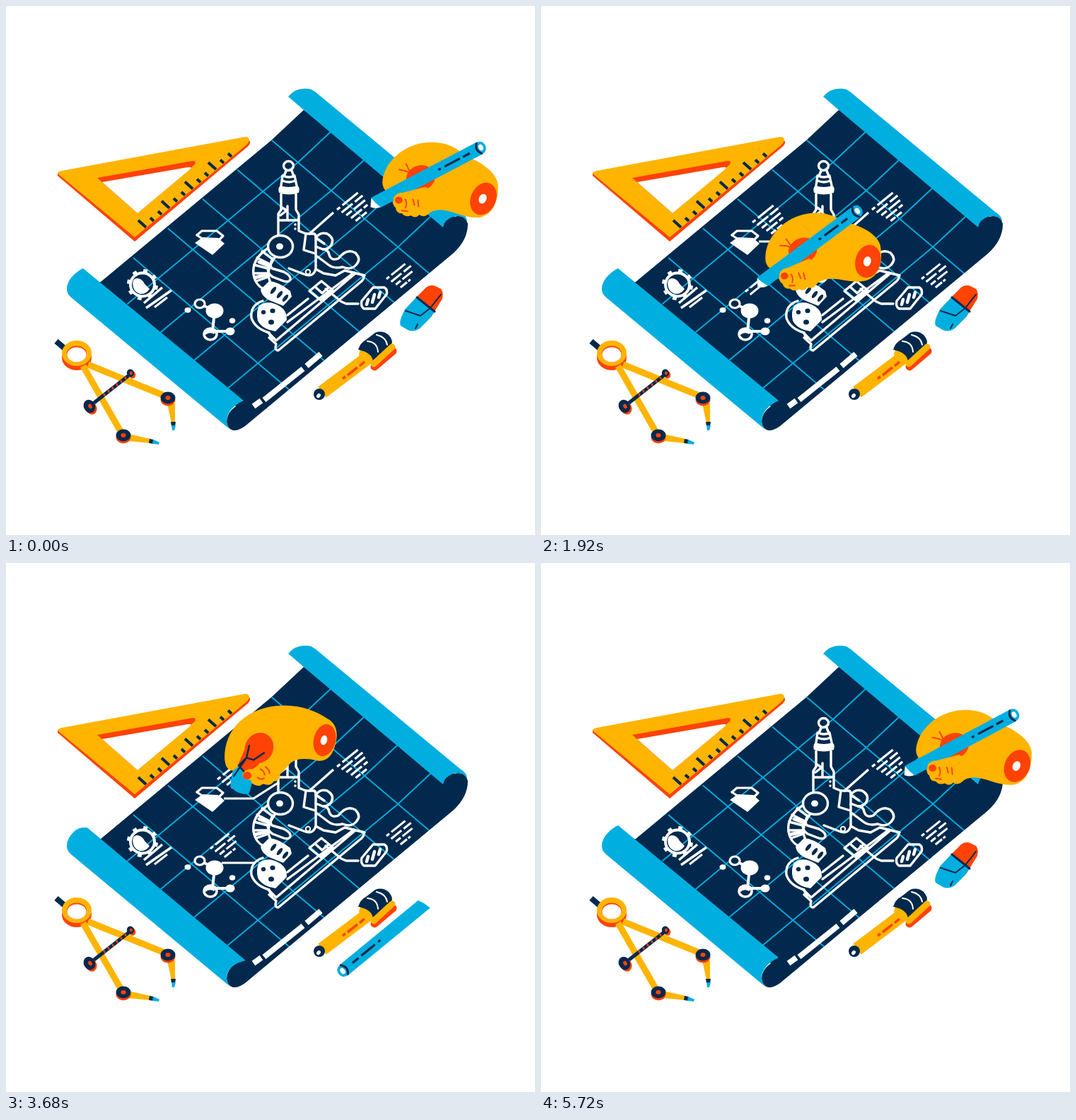
These frames come from a looping animation (748x748 px, 5760 ms). An HTML page with a canvas:

```html
<!DOCTYPE html>
<html lang="en">
<head>
<meta charset="utf-8">
<title>Blueprint desk</title>
<style>
html, body { margin: 0; width: 100%; height: 100%; overflow: hidden; background: #fff; }
canvas { display: block; }
</style>
</head>
<body>
<canvas id="stage" width="748" height="748"></canvas>
<script>
const ctx = document.getElementById('stage').getContext('2d');
const NAVY = '#02294d', CYAN = '#00aee0', GOLD = '#ffb400', RED = '#ff4206', WHITE = '#fff';
const LOOP = 5760, STEP = 40, RAD = Math.PI / 180;

const fill = (d, c) => { ctx.fillStyle = c; ctx.fill(new Path2D(d)); };
const stroke = (d, c, w, cap = 'round') => {
  ctx.strokeStyle = c; ctx.lineWidth = w; ctx.lineCap = cap; ctx.lineJoin = 'round';
  ctx.stroke(new Path2D(d));
};
const line = (x1, y1, x2, y2, c, w, cap = 'butt') => stroke(`M${x1} ${y1}L${x2} ${y2}`, c, w, cap);
const oval = (x, y, rx, ry, c, rot = 0, w = 0) => {
  ctx.beginPath();
  ctx.ellipse(x, y, rx, ry, rot * RAD, 0, 7);
  if (w) { ctx.strokeStyle = c; ctx.lineWidth = w; ctx.stroke(); }
  else { ctx.fillStyle = c; ctx.fill(); }
};
const at = (x, y, rot, draw, sx = 1, sy = sx) => {
  ctx.save();
  ctx.translate(x, y); ctx.rotate(rot * RAD); ctx.scale(sx, sy);
  draw();
  ctx.restore();
};
const clamp = v => Math.max(0, Math.min(1, v));
const span = (t, a, b) => clamp((t - a) / (b - a));
const mix = (a, b, k) => a + (b - a) * k;
// keys: rows of [time, ...values], eased between rows
function track(keys, t) {
  let i = 0;
  while (i < keys.length - 2 && t >= keys[i + 1][0]) i++;
  const a = keys[i], b = keys[i + 1], u = span(t, a[0], b[0]), k = u * u * (3 - 2 * u);
  return a.slice(1).map((v, j) => mix(v, b[j + 1], k));
}

// slanted note strokes
const note = (x, y, lens) => lens.map((n, i) => {
  const sx = x + i * 6.6, sy = y + i * 4;
  return [sx, sy, sx + n * 0.78, sy - n * 0.63];
});
const notes = {
  topRight: note(468, 288, [38, 38, 34, 30, 20]),
  topLeft: note(299, 306, [38, 38, 34, 30, 20]),
  lowLeft: note(289, 404, [34, 36, 30, 20]),
  right: note(538, 386, [34, 36, 30, 18])
};
const leads = {
  top: [[308, 333, 350, 333], [350, 333, 386, 310]],
  low: [[305, 424, 352, 424]]
};
function drawPart(segs, from, to, w, gaps) {
  const n = segs.length;
  segs.forEach(([x1, y1, x2, y2], i) => {
    const a = clamp(from * n - i), b = clamp(to * n - i);
    if (b <= a) return;
    const piece = (p, q) => {
      p = Math.max(p, a); q = Math.min(q, b);
      if (q > p) line(mix(x1, x2, p), mix(y1, y2, p), mix(x1, x2, q), mix(y1, y2, q), WHITE, w);
    };
    const gap = 0.2 + (i * 0.37) % 0.6;
    if (gaps) { piece(0, gap - 0.05); piece(gap + 0.06, 1); } else piece(0, 1);
  });
}
function pointOn(segs, k) {
  const p = clamp(k) * segs.length, i = Math.min(segs.length - 1, Math.floor(p)), s = segs[i];
  return [mix(s[0], s[2], p - i), mix(s[1], s[3], p - i)];
}

function paper(loose) {
  const sheet = 'M421 147L375 190L134 390L128 392L325 566Q312 575 312 588Q314 601 325 600Q331 599 338 594L632 350Q653 331 653 308Q649 294 634 298Z';
  fill(sheet, NAVY);
  ctx.save();
  ctx.clip(new Path2D(sheet));
  for (let i = 0; i < 5; i++) {
    const x = 376 - i * 49, y = 190 + i * 41.5;
    line(x, y, x + 260, y + 220, CYAN, 1.8);
  }
  // the sheet bends near the upper roll
  for (let i = 0; i < 4; i++)
    stroke(`M${459 + i * 47} ${178 + i * 40}l-46 43l-241 200`, CYAN, 1.8);
  ctx.restore();
  fill('M399 128Q412 113 432 118L438 122L642 291Q652 297 652 305Q646 294 632 298Q620 302 618 313L421 147Z', CYAN);
  const k = loose ? 4 : 0;
  fill(`M86 400Q86 389 97 379Q104 373 ${109 + k * 1.5} ${371 + k * .8}L${336 + k * .7} ${558 + k}Q314 568 312 585Q312 594 317 599L92 412Q86 407 86 400Z`, CYAN);
  line(350, 566, 361, 558, WHITE, 8);
  line(365, 557, 420, 513, WHITE, 8);
  line(425, 509, 445, 492, WHITE, 8);
}

function microscope() {
  const w = 3.4, s = d => stroke(d, WHITE, w);
  oval(399.5, 226, 7, 6.5, WHITE, 0, w);
  s('M396 233L394 238M404 233L406 238M392 240Q400 244 408 240M391 247Q400 251 409 247M391 240L389 254M408 240L411 254');
  fill('M388 254Q400 258 412 254Q416 256 414 264Q400 269 386 264Q384 257 388 254Z', WHITE);
  s('M389 266V288L385 294V326M410 266V288L414 295V318L424 322M398 283V302M389 284L398 290M388 296L397 289M386 303H413');
  oval(409, 309, 1.8, 1.8, WHITE); oval(409, 315, 1.8, 1.8, WHITE);
  s('M424 322H436Q438 323 438 327V372M424 322L421 345L437 350M438 372Q434 385 421 379L400 371');
  oval(427, 376, 3.2, 3.2, WHITE, 0, 2);
  // ribbed arm
  s('M371 342Q347 358 350 380Q353 395 364 400L374 391Q366 375 380 356');
  s('M362 347L377 358M355 356L373 365M351 366L370 371M350 378L369 378M354 389L371 383');
  stroke('M358 362L371 367M352 384L369 380', WHITE, 5);
  oval(388, 340, 17.5, 15.5, NAVY);
  oval(388, 340, 17.5, 15.5, WHITE, 0, w);
  oval(387, 340, 5, 4.5, WHITE);
  s('M377 357Q372 366 376 371L393 376Q404 382 402 387Q399 392 390 388L377 383Q370 379 370 370');
  // right knobs and cable
  s('M438 328Q444 319 454 322Q465 328 460 338Q456 344 448 344L438 340M438 328L450 336');
  s('M448 344Q456 344 457 352Q460 361 470 357Q482 342 494 349Q503 358 495 366Q488 374 476 369Q464 372 456 366L440 354M438 372L449 378L466 381L479 374L507 381');
  // objectives
  fill('M360 401L372 389Q386 390 402 403L404 411L392 424L372 416Q361 410 360 401Z', WHITE);
  [[378, 402], [387, 408], [395, 413]].forEach(([x, y]) => oval(x, y, 2.6, 6, NAVY, 38));
  // base drum
  s('M363 417Q345 423 347 441Q352 456 372 462L376 472');
  fill('M358 424Q370 414 388 425Q398 432 397 444L381 460Q362 457 356 445Q353 432 358 424Z', WHITE);
  oval(364, 433, 3.2, 3, NAVY); oval(377, 431, 3.6, 3.2, NAVY); oval(375, 447, 4, 3.5, NAVY);
  // stage rails
  s('M371 462L382 473L494 378M398 437L427 414M398 447L492 377M372 469L382 478Q379 487 385 487L503 389Q509 382 503 380');
  s('M429 403L446 389L462 402L445 416ZM437 397L447 406L455 399');
  s('M452 400L474 418L481 421H498');
  line(428, 323, 463, 292, WHITE, w);
  // battery
  s('M503 417L519 398L535 398Q540 401 538 408L522 428L506 428Q501 424 503 417Z');
  stroke('M510 422L512 415M518 419L521 408M527 412L529 405', WHITE, 4.5);
}

function icons() {
  // gear
  for (let i = 0; i < 8; i++)
    at(193, 394, i * 45 + 12, () => line(17, 0, 22, 0, WHITE, 6));
  oval(193, 394, 17, 16.5, WHITE, 0, 4);
  fill('M180 398Q177 386 185 385Q192 385 196 393L203 400Q198 408 190 407Q182 405 180 398Z', WHITE);
  line(195, 420, 221, 398, WHITE, 3.5);
  line(198, 427, 234, 402, WHITE, 3.5);
  line(210, 426, 228, 412, WHITE, 3);
  // molecule
  stroke('M276 422L295 431L292 460L317 460', WHITE, 4);
  oval(295, 431, 12.5, 10.5, WHITE);
  oval(274, 421, 7, 6, NAVY); oval(274, 421, 7, 6, WHITE, 0, 3.2);
  oval(289, 464, 9, 8, NAVY); oval(289, 464, 9, 8, WHITE, 0, 3.5);
  fill('M280 460Q289 453 298 460L294 464Q288 460 282 465Z', WHITE);
  oval(317, 460, 6.5, 5.5, WHITE);
  oval(257, 430, 4.5, 3.7, WHITE); oval(320, 445, 4.3, 3.7, WHITE);
  // folded card
  stroke('M270 324L277 318H298L307 325L301 331', WHITE, 3.2);
  stroke('M270 324L276 328', WHITE, 3.2);
  fill('M267 335L278 327L300 328L309 336L292 352Z', WHITE);
}

function setSquare() {
  fill('M73 236L341 190L345 191Q346 196 339 201L182 333L73 240Z', RED);
  fill('M79 233L338 185Q344 185 344 190Q343 194 338 198L182 327L73 237Q73 234 79 233Z', GOLD);
  fill('M129 243L264 219Q270 219 267 224L186 293Z', RED);
  fill('M136 249L257 228Q264 227 260 231L186 293Z', WHITE);
  for (let i = 0; i < 12; i++) {
    const x = 198 + i * 11, y = 313 - i * 9.1, n = i % 3 ? 5 : 11;
    line(x, y, x - n, y - n * .9, NAVY, 4);
  }
}

function joint(x, y, rx, ry) {
  oval(x, y + 3, rx, ry, RED);
  oval(x, y, rx, ry, NAVY);
  oval(x, y, 3.6, 3, RED);
}

function compass() {
  line(71, 474, 85, 486, NAVY, 8);
  oval(100, 497, 21, 18, RED);
  line(116, 507, 224, 551, GOLD, 9);
  line(109, 509, 164, 605, GOLD, 9);
  oval(100, 491, 21, 18, GOLD);
  oval(100, 492, 14, 11.5, RED);
  oval(100, 493, 13.5, 10.5, WHITE);
  line(122, 563, 178, 519, NAVY, 5);
  for (let i = 0; i < 6; i++) line(138 + i * 6, 550 - i * 4.7, 140 + i * 6, 549 - i * 4.7, RED, 4);
  oval(120, 568, 8, 10, RED, -30); oval(118, 566, 8, 9.5, NAVY, -30); oval(119, 566, 2.5, 3.5, RED, -30);
  oval(178, 521, 5, 6, RED, -30); oval(176, 519, 5, 5.5, NAVY, -30); oval(177, 519, 2, 2.5, RED);
  fill('M228 562L239 562L239 590L234 590Z', GOLD);
  fill('M233 588H240L239 594H234Z', NAVY); fill('M234 593H240L238 600H235Z', CYAN);
  fill('M172 605L204 612L203 618L172 615Z', GOLD);
  fill('M203 612L208 613L208 619L202 618Z', NAVY); fill('M208 613L217 617L216 620L207 619Z', CYAN);
  joint(229, 554, 10.5, 8.5); joint(166, 607, 10.5, 8.5);
}

function marker() {
  line(521, 510, 547, 488, RED, 11, 'round');
  line(447, 546, 512, 497, GOLD, 19);
  oval(510, 495, 10, 12, GOLD, -38);
  oval(443, 549, 8, 8, NAVY); oval(442, 551, 2.6, 3.4, WHITE, 35);
  line(476, 527, 480, 524, RED, 3.5);
  line(483, 522, 497, 511, RED, 3.5);
  line(500, 509, 507, 503, RED, 3.5);
  fill('M498 486Q501 476 509 472L522 462Q532 458 541 465Q548 473 545 479L519 503Q518 490 498 486Z', NAVY);
  stroke('M511 474Q525 475 526 489M524 465Q537 468 539 479', WHITE, 2);
  line(520, 506, 546, 482, GOLD, 9, 'round');
}

function eraser() {
  fill('M580 412L594 398Q600 393 607 396L615 400Q619 404 617 414L601 440L590 430Z', RED);
  fill('M580 412L606 432L600 441L585 456Q576 462 568 458L558 452Q556 448 559 440L564 429Z', CYAN);
  stroke('M581 412L606 432', NAVY, 3);
  stroke('M565 431L586 438L600 427L615 408M579 456L582 450', NAVY, 2);
}

// tip at the local origin, cap at distance len
function pen(x, y, rot, len) {
  at(x, y, rot, () => {
    fill('M0 2L7 -9L15 9Q6 9 0 2Z', WHITE);
    fill(`M7 -9.5H${len - 2}Q${len + 8} -9 ${len + 8} 0Q${len + 8} 9 ${len - 2} 9.5H13L9 0Z`, CYAN);
    [[68, 64], [58, 33], [28, 17]].forEach(([a, b]) => { if (a < len - 20) line(len - a, 0, len - b, 0, NAVY, 3.2); });
    stroke(`M${len - 2} -8Q${len - 9} 0 ${len - 2} 8`, NAVY, 3);
    oval(len + 1, 0, 3.2, 4.6, WHITE);
  });
}

function wrist(x, y, rx, ry, rot) {
  oval(x, y, rx, ry, RED, rot);
  oval(x - 1, y, rx * .3, ry * .3, WHITE, rot);
}

function writeHand(x, y, rot) {
  at(x, y, rot, () => {
    ctx.translate(-610, -245);
    fill('M530 250C531 222 560 193 598 192C622 191 637 200 650 212C670 219 693 234 696 252C697 277 688 298 667 300C646 301 630 289 612 289Q601 290 597 294Q590 301 583 296Q578 302 571 297Q563 300 558 294Q550 294 549 286Q542 280 546 266Q531 264 530 250Z', GOLD);
    oval(585, 243, 21, 18, RED, -15);
    stroke('M554 231Q562 232 570 236M564 223L570 235', RED, 2);
    pen(512, 283, -27.7, 179);
    fill('M546 272Q549 264 560 264L592 256Q600 260 598 270L578 284Q556 290 547 282Z', GOLD);
    oval(553.5, 275, 5.5, 5, RED);
    stroke('M563 274Q566 280 563 286M574 274L576 282M581 275L582 284M558 290L566 291', RED, 2);
    wrist(675, 273, 18, 24, 24);
  }, .985);
}

function placeHand(x, y, penState) {
  at(x, y, 0, () => fill('M530 408Q519 424 519 445Q519 460 535 462L556 462L560 420Z', GOLD));
  pen(...penState);
  at(x, y, 0, () => {
    fill('M536 386Q555 374 585 376C613 377 631 389 645 401Q666 414 667 435Q664 468 648 473C628 473 618 464 603 468Q583 482 560 479Q541 479 540 466Q538 460 551 455L551 432Q540 406 536 386Z', GOLD);
    fill('M535 459Q539 444 546 446L546 458Q541 464 535 459Z', RED);
    wrist(645, 443, 17, 24, 20);
  });
}

function eraseHand(x, y, sx, sy) {
  at(x, y, 0, () => {
    ctx.translate(-430, -266);
    fill('M288 292C287 250 321 218 370 217C397 216 418 225 433 235Q449 243 447 263C444 286 434 297 420 295Q394 289 382 298L367 314Q366 325 358 324Q353 332 343 328Q333 333 326 326L318 313L300 309Q289 309 288 292Z', GOLD);
    oval(337, 277, 20, 22, RED, 30);
    fill('M306 303L316 280L327 267L347 272L350 283L335 302L320 313Z', RED);
    fill('M299 310L309 302L328 323L323 341Q315 345 303 338L296 332Z', CYAN);
    stroke('M301 317L319 291L323 274M319 291L329 294L344 284M309 303L322 318M319 291L308 302', NAVY, 2.4);
    fill('M313 314Q318 306 328 307L344 296L357 312L354 327Q343 326 338 331Q325 329 325 322Q314 323 313 314Z', GOLD);
    oval(320, 316, 6, 5.5, RED);
    stroke('M339 307Q344 310 345 315M346 304Q351 307 352 313M335 319Q340 323 344 320', RED, 2);
    wrist(430, 266, 15.5, 23, 14);
  }, sx, sy);
}

const REST = [599, 476, -219.4, 158];
const GRIP = [84, -52];

// hand centre while writing: [x, y, angle]
function writePose(t) {
  const on = (segs, a, b) => {
    const [x, y] = pointOn(segs, span(t, a, b));
    return [x + GRIP[0], y + GRIP[1], -9];
  };
  if (t >= 5560) return track([[5560, 601, 340, -2], [5720, 609, 260, -.5], [5760, 611, 245, 0]], t);
  if (t < 320) return track([[0, 611, 245, 0], [320, 383, 254, -9]], t);
  if (t < 1040) return on(notes.topLeft, 320, 1040);
  if (t < 1200) return track([[1040, 425, 257, -9], [1200, 392, 281, -9]], t);
  if (t < 1520) return on(leads.top, 1200, 1520);
  if (t < 1720) return track([[1520, 470, 258, -9], [1720, 373, 352, -9]], t);
  if (t < 2240) return on(notes.lowLeft, 1720, 2240);
  if (t < 2360) return track([[2240, 409, 351, -9], [2360, 389, 371, -9]], t);
  return track([[2360, 389, 371, -9], [2520, 429, 370, -9], [2560, 436, 371, -9], [2960, 577, 415, -9]], t);
}

function erasePose(t) {
  const p = track([
    [3400, 640, 440, .9, .95], [3720, 442, 242, 1, 1], [3900, 434, 246, 1, 1],
    [4040, 492, 254, 1, 1], [4200, 430, 266, 1, 1], [4400, 420, 342, 1, 1],
    [4840, 424, 346, .98, .98], [4960, 458, 362, .95, .96], [5080, 523, 360, .9, .95],
    [5300, 640, 440, .9, .95]], t);
  const rub = (a, b, n) => t > a && t < b ? Math.sin(span(t, a, b) * Math.PI * 2 * n) * 12 : 0;
  const r = rub(3720, 4040, 3) + rub(4400, 4840, 4);
  return [p[0] + r, p[1] - r * .8, p[2], p[3]];
}

function hand(t) {
  if (t < 2960 || t >= 5560) {
    writeHand(...writePose(t));
  } else if (t < 3400) {
    const [dx, dy] = track([[2960, 0, -10], [3200, 0, 0], [3340, -8, 16], [3400, -2, 0]], t);
    placeHand(dx, dy, track([[2960, 487, 467, -36, 178], [3200, 567, 488, -112, 100], [3360, ...REST]], t));
  } else if (t < 5300) {
    eraseHand(...erasePose(t));
  } else {
    const [dx, dy] = track([[5300, 0, 0], [5400, 4, 14], [5560, 19, -75]], t);
    placeHand(dx, dy, track([[5400, ...REST], [5560, 503, 377, -29, 178]], t));
  }
}

function draw(t) {
  ctx.fillStyle = WHITE;
  ctx.fillRect(0, 0, 748, 748);
  setSquare();
  paper(t >= 2800 && t < 5480);
  icons();
  microscope();
  drawPart(notes.topRight, 0, 1, 3.2, true);
  drawPart(notes.right, 0, 1, 3, true);
  drawPart(notes.topLeft, span(t, 3720, 4000), span(t, 320, 1040), 3.2, true);
  drawPart(notes.lowLeft, span(t, 4400, 4800), span(t, 1720, 2240), 3, true);
  drawPart(leads.top, 0, Math.min(span(t, 1200, 1520), 1 - span(t, 4040, 4200)), 3.2);
  drawPart(leads.low, span(t, 4840, 5000), span(t, 2360, 2560), 3.2);
  compass();
  marker();
  if (t < 3400 || t >= 5300) eraser();
  if (t >= 3400 && t < 5300) pen(...REST);
  hand(t);
}

const start = performance.now();
function frame() {
  const t = Math.max(0, performance.now() - start) % LOOP;
  draw(Math.floor(t / STEP) * STEP);
  requestAnimationFrame(frame);
}
frame();
</script>
</body>
</html>
```
